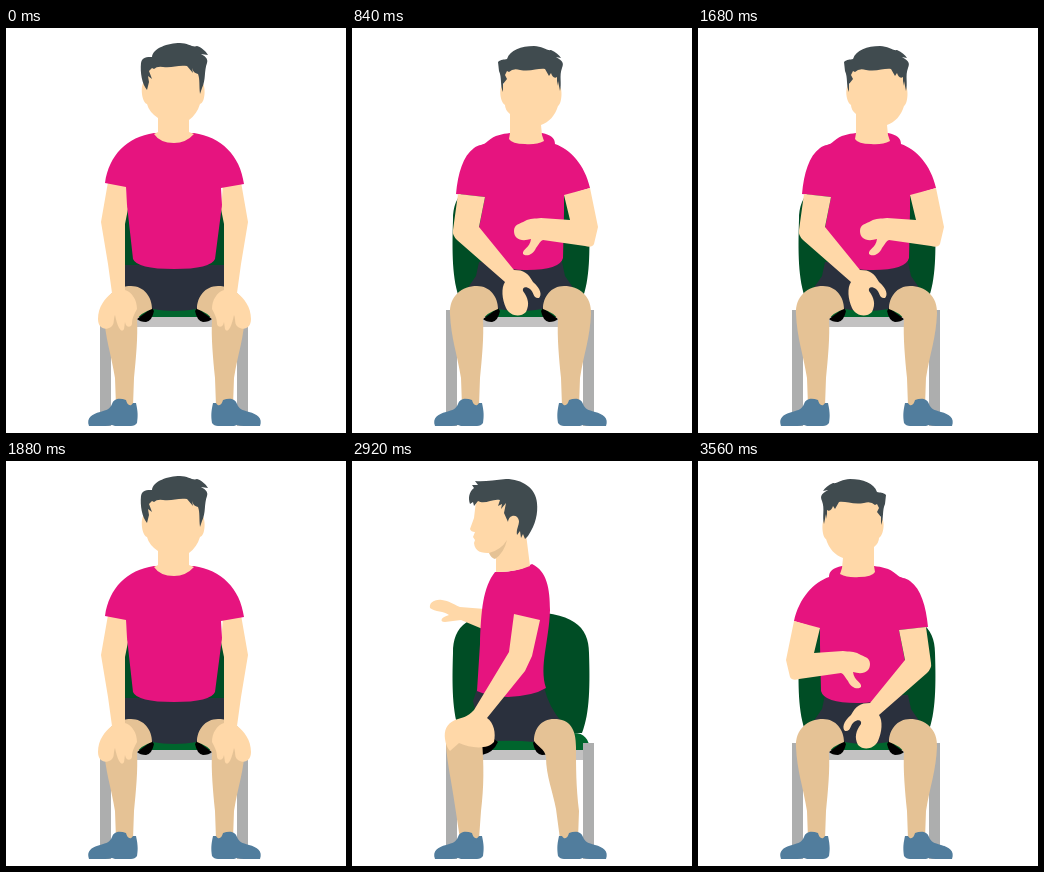
Write an HTML page that moves like this. It is 340 px wide and 405 px high and loops after 3760 ms.

```html
<!DOCTYPE html>
<html lang="en">
<head>
<meta charset="utf-8">
<title>Seated twist</title>
<style>
  html, body { margin: 0; width: 100%; height: 100%; overflow: hidden; background: #fff; }
  svg { display: block; width: 100vw; height: 100vh; }
  .skin { fill: #ffd8a8; }
  .shade { fill: #e5c295; }
  .shirt { fill: #e6147f; }
  .hair { fill: #404b4f; }
  .shorts { fill: #2a303d; }
  .green { fill: #004d25; }
  .seat { fill: #00652d; }
  .shoe { fill: #517d9d; }
</style>
</head>
<body>
<svg viewBox="0 0 340 405">
  <defs>
    <path id="leg" d="M98 286C97 268 110 258 125 258C138 258 146 269 146 281Q135 285 131 291C132 309 130 330 128 350L127 378H110L109 350C105 325 99 310 98 286Z"/>
    <path id="shoe" d="M83 398C80 390 86 386 94 384C101 382 104 381 106 376C108 370 114 370 120 372C121 376 124 380 127 375L130 375C132 384 132 388 131 395Q129 398 125 398H109L106 397Q103 398 99 398Z"/>
    <path id="hem" d="M131 291L146 280L148 283Q146 293 140 294Q134 294 131 291Z"/>
    <path id="arm" d="M102 154L120 157L122 181L119 196V262C126 264 131 272 131 281C128 287 126 290 126 296C125 300 120 300 119 294L118 301C116 305 112 302 109 287C107 292 109 296 105 299C99 303 92 300 92 291C92 279 99 270 106 265L102 236L95 194Z"/>
  </defs>

  <g id="chair">
    <path id="back" class="green" d="M101 192C101 165 115 151 168 150C221 151 237 165 237 192C238 223 238 252 230 272H108C100 252 100 223 101 192Z"/>
    <path class="seat" d="M99 289C100 278 106 272 115 272H222C232 272 237 278 238 289Z"/>
    <path fill="#c3c2c2" d="M94 289H242V299H94Z"/>
    <path fill="#adaeae" d="M94 282H105V398H94ZM231 282H242V398H231Z"/>
  </g>

  <g id="seated">
    <path class="shorts" d="M127 234H210L213 248L222 261L191 281Q168 285 146 281L115 261L124 248Z"/>
    <use href="#hem"/><use href="#hem" transform="translate(337) scale(-1 1)"/>
    <g class="shade"><use href="#leg"/><use href="#leg" transform="translate(337) scale(-1 1)"/></g>
  </g>

  <g id="front">
    <path class="green" d="M119 178H219V240H119Z"/>
    <path class="shorts" d="M119 237H219V258H119Z"/>
    <g class="skin"><use href="#arm"/><use href="#arm" transform="translate(337) scale(-1 1)"/></g>
    <path class="shirt" d="M99 155C103 127 121 109 148 105H188C215 109 234 127 238 156L215 160L216 177L209 231Q205 241 168 241Q131 241 127 231L121 177L120 159Z"/>
    <path class="skin" d="M139 40Q168 28 195 40V54C200 54 200 75 194 76Q191 86 183 92V104L188 106Q180 115 168 115Q154 115 148 106L152 104V90Q143 84 141 76C135 74 134 54 139 54Z"/>
    <path class="hair" d="M141 62C136 56 134 45 135 35C136 29 141 29 146 29C147 20 162 15 174 15C182 15 187 20 191 18C197 20 200 24 202 27L195 26C201 29 202 32 201 35C198 43 200 52 196 60L194 66C193 57 194 51 192 46C188 45 187 43 186 40L187 45L181 38C171 37 167 40 157 39Q151 38 148 41L146 40L143 43L146 51L142 48L143 54Z"/>
  </g>

  <g id="turn">
    <path class="shirt" d="M104 166C106 145 111 128 122 120C127 116 131 118 136 113C143 107 150 106 158 105H190C199 107 203 110 203 116C218 121 233 137 238 160L212 168V184L211 230Q208 242 175 242Q147 243 127 225L127 200L133 169Z"/>
    <path class="skin" d="M106 166L133 169L127 199L162 242C172 242 176 245 181 254C189 261 190 267 187 270C181 271 182 264 178 261C174 258 170 259 171 263C176 270 178 276 174 284C168 290 158 288 154 280C150 271 149 260 153 254L105 212Q100 207 101 202ZM212 167L238 160L246 199L242 216Q240 220 233 218L191 212C188 213 188 215 184 220C181 227 174 229 171 226C170 221 178 220 179 211C169 214 162 211 162 203C162 196 168 196 173 193C178 190 183 191 189 190L218 192Z"/>
    <path class="skin" d="M152 40Q180 29 207 40V58C211 59 210 76 206 78C203 88 197 94 189 97L190 107L192 113Q184 117 173 116Q160 116 157 111L158 105V86Q153 82 153 77C147 73 147 56 152 56Z"/>
    <path class="hair" d="M151 64C148 58 150 49 147 43L146 34C149 31 152 32 155 31C158 22 169 18 182 18C190 18 195 23 199 22C204 24 207 27 209 30L204 29C211 33 212 35 210 40C207 48 210 55 208 63L206 53L205 58V49C202 51 200 48 199 45L197 48L193 41C186 40 179 44 168 42Q161 40 157 44L155 43L153 47L155 51L151 56Z"/>
  </g>

  <g id="side">
    <path class="shorts" d="M144 226L211 228L215 240L210 262L194 280Q172 279 154 281L126 261Q139 247 144 226Z"/>
    <path d="M131 286L153 279L155 282Q153 293 146 294Q139 294 136 288ZM190 281L194 278L206 284V294Q195 292 190 281Z"/>
    <path class="shade" d="M112 286C112 268 118 258 134 258C147 258 154 268 154 280C151 285 143 288 142 296C142 315 135 331 132 348L128 378H110L109 350C112 325 112 306 112 286Z"/>
    <path class="shade" d="M206 280L242 277C243 292 236 322 233 345L228 378H209L207 350C204 326 204 304 206 280Z"/>
    <path class="skin" d="M203 148L228 146C235 143 239 140 246 139C254 138 259 142 258 147C253 151 244 150 239 154C247 156 249 161 243 161L227 159L203 169Z"/>
    <path class="shirt" d="M156 103C141 110 138 128 138 149C139 181 149 205 142 227Q155 235 180 236Q201 235 211 230L208 183C207 150 205 126 193 111Q172 112 156 103Z"/>
    <path class="skin" d="M148 159L174 153L179 191L214 249C220 256 227 257 233 259C242 263 244 270 243 278C242 284 240 288 238 290L229 282C218 287 201 289 194 281C192 272 194 262 201 257L163 210L156 195Z"/>
    <path class="skin" d="M180 38L212 40L214 57L218 68Q217 71 213 71L215 76L213 79L214 82C213 91 207 92 197 92L192 97V111Q172 111 158 105L162 73L168 58Z"/>
    <path class="shade" d="M181 79Q187 89 199 92Q197 97 193 98Q184 92 181 79Z"/>
    <path class="hair" d="M160 75C152 63 150 52 151 42C152 27 166 18 182 18C194 19 204 21 213 20L210 24L216 24L214 27C219 31 220 37 218 43L215 41L214 45L210 40C203 44 195 37 188 39L190 45L186 43L187 48L182 42L184 52L180 61C179 53 170 53 169 60C169 65 172 68 171 74L168 70L167 77L165 73L163 78Z"/>
  </g>

  <g class="shoe"><use href="#shoe"/><use href="#shoe" transform="translate(337) scale(-1 1)"/></g>
</svg>
<script>
  const LOOP = 3760;
  // start time, pose, mirror width (0 = not mirrored)
  const steps = [
    [0, 'front', 0], [840, 'turn', 0], [1040, 'side', 0], [1680, 'turn', 0],
    [1880, 'front', 0], [2720, 'turn', 334], [2920, 'side', 336], [3560, 'turn', 334]
  ];
  const part = id => document.getElementById(id);
  const show = (id, on) => part(id).style.display = on ? '' : 'none';
  const start = performance.now();

  function draw() {
    const time = (performance.now() - start) % LOOP;
    const [, pose, mirror] = steps.findLast(step => step[0] <= time);
    for (const id of ['front', 'turn', 'side']) show(id, id === pose);
    show('seated', pose !== 'side');
    show('back', pose !== 'front');
    part(pose).setAttribute('transform', mirror ? `translate(${mirror}) scale(-1 1)` : '');
    requestAnimationFrame(draw);
  }
  draw();
</script>
</body>
</html>
```
